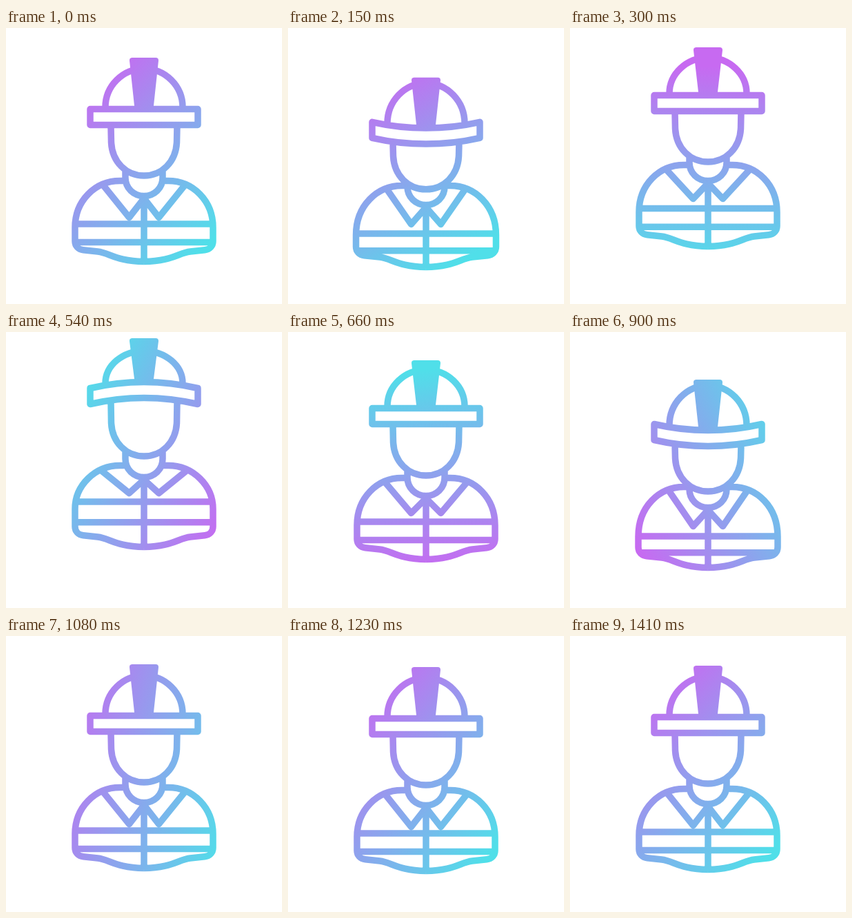
An HTML page that plays this animation: 400 px wide and 400 px high, repeating every 3440 ms.

```html
<!DOCTYPE html>
<html lang="en">
<head>
<meta charset="utf-8">
<title>Builder</title>
<style>
html, body { margin: 0; height: 100%; overflow: hidden; background: #fff; }
svg { display: block; width: 100%; height: 100%; }
</style>
</head>
<body>
<svg viewBox="0 0 400 400">
  <linearGradient id="g" gradientUnits="userSpaceOnUse">
    <stop stop-color="#c76af1"/>
    <stop offset="1" stop-color="#50dfe9"/>
  </linearGradient>
  <path id="lines" fill="none" stroke="url(#g)" stroke-width="9.5" stroke-linejoin="round"/>
  <path id="crest" fill="url(#g)" stroke="url(#g)" stroke-width="8" stroke-linejoin="round"/>
</svg>
<script>
const LOOP = 3440, STEP = 30, END = 1410;
const $ = id => document.getElementById(id);

// The whole figure shifted by y, without any bending
const rigid = (t, angle, y) => [t, angle, y, y, 0, y, y, y, y, y, y];

// time, gradient angle, then vertical offsets:
// crest, brim, brim bend, chin, shoulder, upper stripe, hem, neckline, lapel
const KEYS = [
  rigid(0, 225, 0),
  [130, 237, 30, 20, 9, 21, 8, 15, 9, 14, 11],
  [300, 270, -15, -20, 0, -20, -23, -22.5, -22, -22, -27],
  [455, 342, -41, -42, -9, -41, -35, -43, -34, -40, -47],
  [540, 390, -34, -36, -9, -34, -28, -38, -27, -33, -41],
  [660, 445, -2, -7, 0, -6, -10, -9, -9, -6, -12],
  [800, 487, 34, 23, 11, 24, 9, 18, 9, 17, 13],
  [900, 512, 26, 16, 9, 17, 3, 12, 3, 11, 7],
  rigid(1080, 558, -2),
  rigid(1230, 578, 2),
  rigid(END, 585, 0)
];

// Slope per key: flat at turning points and at both ends
function slope(i, c) {
  const a = KEYS[i - 1], b = KEYS[i], d = KEYS[i + 1];
  if (!a || !d) return 0;
  const s = (b[c] - a[c]) / (b[0] - a[0]), r = (d[c] - b[c]) / (d[0] - b[0]);
  return s * r <= 0 ? 0 : 2 * s * r / (s + r);
}

function pose(t) {
  let i = 0;
  while (i < KEYS.length - 2 && t >= KEYS[i + 1][0]) i++;
  const a = KEYS[i], b = KEYS[i + 1], h = b[0] - a[0], u = (t - a[0]) / h, v = 1 - u;
  return a.slice(1).map((p, j) => {
    const c = j + 1;
    return v * v * (1 + 2 * u) * p + u * u * (3 - 2 * u) * b[c]
      + h * u * v * (v * slope(i, c) - u * slope(i + 1, c));
  });
}

// A left half and its mirror image
const both = half => half(x => x) + half(x => 400 - x);

function hat(crest, brim, bend) {
  const base = 115 + brim + bend / 2, rise = 56 + brim / 2 - crest * .4 + bend / 2;
  const top = 117.5 + brim, bottom = top + 23;
  return `M144 ${base} A56 ${rise} 0 0 1 256 ${base}
    M122 ${top} Q200 ${top + 2 * bend} 278 ${top}
    V${bottom} Q200 ${bottom + 2 * bend} 122 ${bottom} Z`;
}

function head(y, top, neck) {
  const u = 217 + neck;
  return both(x => `M${x(152)} ${top} L${x(152.5)} ${166 + y}
    C${x(154)} ${194 + y} ${x(174)} ${214 + y} 200 ${214 + y}
    M${x(173)} ${206 + y} V${u} C${x(173)} ${u + 15} ${x(185)} ${u + 26.5} 200 ${u + 26.5}`);
}

function body(shoulder, hip, hem, side) {
  const s = 221.5 + shoulder, b = 309 + hem;
  return both(x => `M${x(173)} ${s} H${x(165)}
    C${x(129)} ${s} ${x(side)} ${s + 29} ${x(side)} ${hip} V${b}
    C${x(side)} ${b + 7} ${x(side + 5)} ${b + 12} ${x(side + 12)} ${b + 12.7}
    L${x(133)} ${b + 15} C${x(150)} ${b + 17} ${x(160)} ${b + 29} 200 ${b + 29.5}`);
}

function jacket(stripe, hem, side, apex, fold, tip, spread) {
  const band = y => `M${side} ${y} H${400 - side}`;
  return band(284 + stripe) + band(310.5 + stripe * .7 + hem * .3)
    + `M200 ${apex - 1} V${338 + hem}
    M${141 + spread} ${fold} L178.5 ${tip} L200 ${apex} L221.5 ${tip} L${259 - spread} ${fold}`;
}

function draw(t) {
  const [angle, crest, brim, bend, chin, shoulder, stripe, hem, neck, lapel] = pose(t);
  const a = angle * Math.PI / 180, dx = 145 * Math.cos(a), dy = 145 * Math.sin(a);
  const ends = { x1: 200 + dx, y1: 200 + dy, x2: 200 - dx, y2: 200 - dy };
  for (const k in ends) $('g').setAttribute(k, ends[k]);

  const side = 100 - Math.max(0, (crest - 20) / 6);
  $('lines').setAttribute('d',
    hat(crest, brim, bend)
    + head(chin, 142 + brim + bend * .6, neck)
    + body(shoulder, 289 + (stripe + hem) / 2, hem, side)
    + jacket(stripe, hem, side, 247 + neck, 228 + shoulder, 274.5 + lapel, crest / 9));
  $('crest').setAttribute('d',
    `M183 ${47 + crest} H217 L209.7 ${115 + brim + bend} H190.3 Z`);
}

const start = performance.now();
function tick() {
  const t = (performance.now() - start) % LOOP;
  draw(Math.min(END, Math.floor(t / STEP) * STEP));
  requestAnimationFrame(tick);
}
tick();
</script>
</body>
</html>
```
